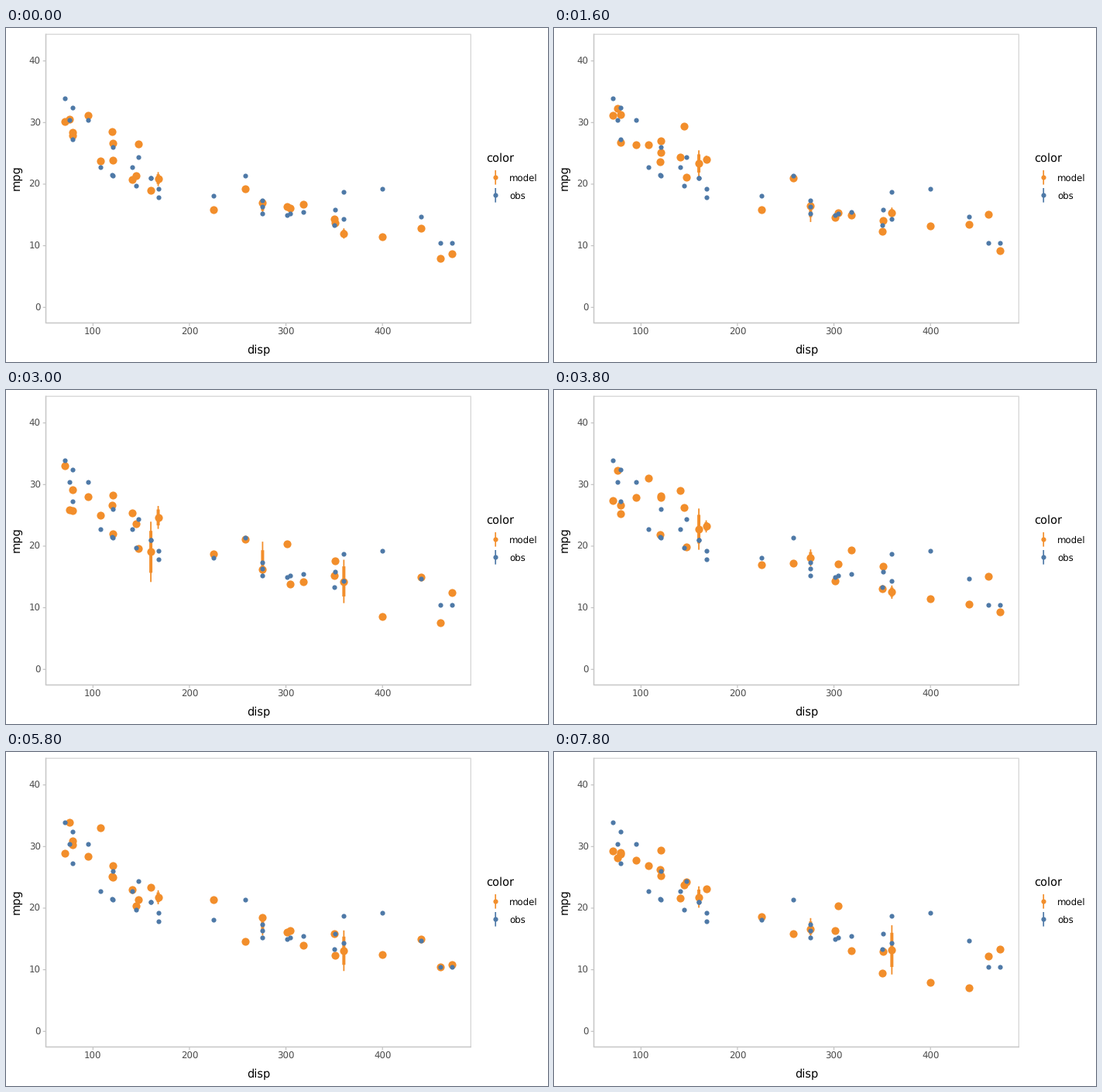
Animation of 700 by 432 pixels, one loop 8 s. Source, as a matplotlib script:

```python
import numpy as np
import matplotlib.pyplot as plt
from matplotlib.animation import FuncAnimation
from matplotlib.collections import LineCollection

W, H, DPI = 700, 432, 100
FRAMES, STEP = 40, 200
PT = 72 / DPI
ORANGE, BLUE = "#f28e2b", "#4e79a7"
BORDER, AXIS, TICK, INK = "#d9d9d9", "#c9c9c9", "#b8b8b8", "#4d4d4d"
NOISE = 2.7  # residual spread of the model, in mpg

plt.rcParams.update({"font.family": "DejaVu Sans", "text.hinting": "none"})

# One entry per car
DISP = np.array([160, 160, 108, 258, 360, 225, 360, 146.7, 140.8, 167.6,
                 167.6, 275.8, 275.8, 275.8, 472, 460, 440, 78.7, 75.7, 71.1,
                 120.1, 318, 304, 350, 400, 79, 120.3, 95.1, 351, 145, 301,
                 121])
MPG = np.array([21, 21, 22.8, 21.4, 18.7, 18.1, 14.3, 24.4, 22.8, 19.2,
                17.8, 16.4, 17.3, 15.2, 10.4, 10.4, 14.7, 32.4, 30.4, 33.9,
                21.5, 15.5, 15.2, 13.3, 19.2, 27.3, 26, 30.4, 15.8, 19.7, 15,
                21.4])
TREND = 72.2 - 9.9 * np.log(DISP)
GROUPS = [(d, np.flatnonzero(DISP == d)) for d in np.unique(DISP)]


def px(disp):
    return 112.3 + (disp - 100) * 1.2463


def py(mpg):
    return 361.3 - mpg * 7.967


fig = plt.figure(figsize=(W / DPI, H / DPI), dpi=DPI, facecolor="white")
ax = fig.add_axes([0, 0, 1, 1])
ax.set_xlim(0, W)
ax.set_ylim(H, 0)
ax.axis("off")


def line(xs, ys, color, width):
    ax.plot(xs, ys, color=color, lw=width * PT, solid_capstyle="butt",
            snap=False, zorder=1)


def dots(xs, ys, color, size, z):
    return ax.plot(xs, ys, "o", color=color, ms=size * PT, mew=0, zorder=z,
                   snap=False)[0]


def bars(width, z):
    return ax.add_collection(
        LineCollection([], colors=ORANGE, linewidths=width * PT, zorder=z,
                       snap=False), autolim=False)


def label(x, y, text, size, color="black", **kw):
    ax.text(x, y, text, fontsize=size * PT, color=color, **kw)


# Panel and axes
line([51.5, 600.3, 600.3], [8.2, 8.2, 381.5], BORDER, 1.4)
line([51.5, 51.5, 601], [7.5, 381.5, 381.5], AXIS, 1.6)
for d in (100, 200, 300, 400):
    line([px(d)] * 2, [382, 385.5], TICK, 1)
    label(px(d), 397, str(d), 11.73, INK, ha="center")
for m in (0, 10, 20, 30, 40):
    line([47.7, 51], [py(m)] * 2, TICK, 1)
    label(44.6, py(m) + 4.3, str(m), 11.73, INK, ha="right")
label(326, 420.5, "disp", 14.67, ha="center")
label(18, 194, "mpg", 14.67, ha="center", va="baseline",
      rotation=90, rotation_mode="anchor")

# Legend
label(620.3, 173, "color", 14.67)
for y, name, color in ((193.3, "model", ORANGE), (216.3, "obs", BLUE)):
    line([632.2] * 2, [y - 9.3, y + 9.3], color, 1.7)
    dots([632.2], [y], color, 6.2, 2)
    label(650.3, y + 4.3, name, 11.73)

# Data
thin, thick = bars(1.8, 2), bars(4, 3)
model = dots(*np.zeros((2, len(GROUPS))), ORANGE, 10.2, 4)
dots(px(DISP), py(MPG), BLUE, 6.2, 5)
model.set_xdata([px(d) for d, _ in GROUPS])


def update(k):
    """Draw every car afresh; cars of equal displacement share one
    median with its 66 % and 95 % intervals."""
    rng = np.random.default_rng(40 + k)
    draw = np.clip(rng.normal(TREND, NOISE), 2.6, 36)
    model.set_ydata([py(np.median(draw[i])) for _, i in GROUPS])
    for coll, share in ((thin, 0.95), (thick, 0.66)):
        ends = [(1 - share) / 2, (1 + share) / 2]
        coll.set_segments([[(px(d), py(q)) for q in np.quantile(draw[i], ends)]
                           for d, i in GROUPS if len(i) > 1])
    return model, thin, thick


anim = FuncAnimation(fig, update, frames=FRAMES, interval=STEP,
                     init_func=lambda: update(0), repeat=True, repeat_delay=0)
plt.show()
```
